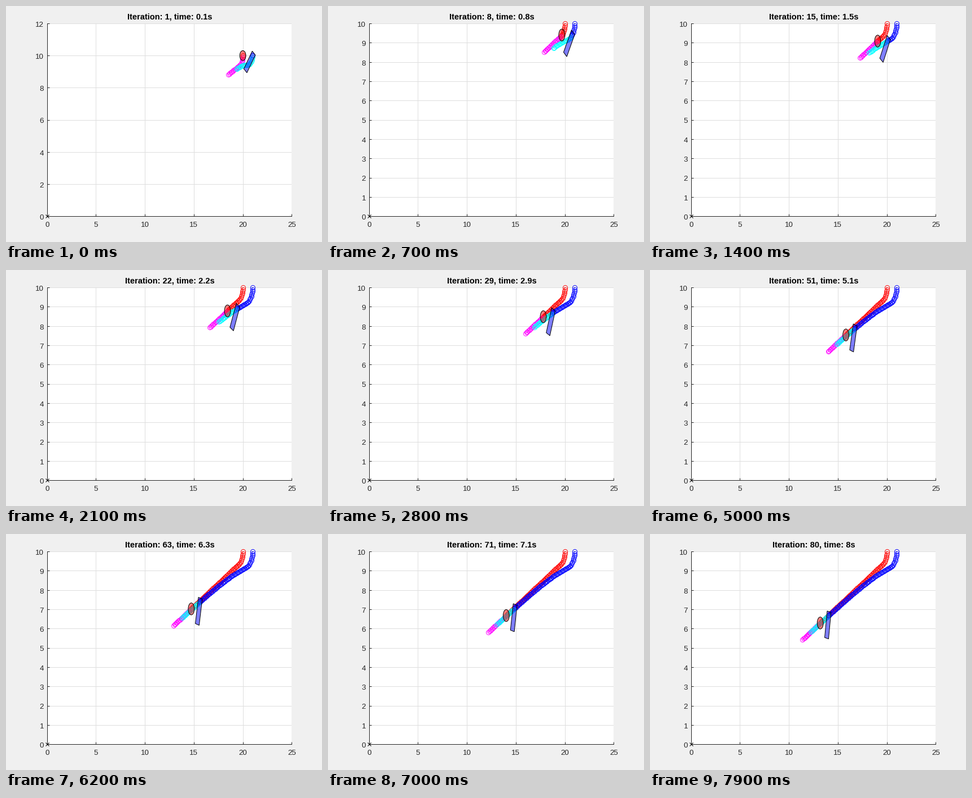
These frames come from a looping animation (560 by 420 pixels, 8000 ms). A matplotlib script:

```python
import numpy as np
import matplotlib.pyplot as plt
from matplotlib.animation import FuncAnimation
from matplotlib.patches import Circle, Polygon

W, H, DPI = 560, 420, 100
PX = 72 / DPI                     # one pixel in points
FRAMES, HORIZON, STEP = 80, 20, 0.1
GOAL = np.radians(205.5)          # direction of the line to the origin
RADIUS, REACH = 0.85, 2.5         # turning circle and line-following distance
INK = "#262626"

plt.rcParams["font.family"] = "Liberation Sans"


def drive(pos, heading, n, radius, reach):
    """Unit-speed steps with bounded turning, easing onto the goal line."""
    pos, path, angles = np.array(pos, float), [], []
    for _ in range(n + 1):
        path.append(pos.copy())
        angles.append(heading)
        off = pos[0] * np.sin(GOAL) - pos[1] * np.cos(GOAL)
        want = GOAL + np.arcsin(np.clip(off / reach, -1, 1))
        turn = np.clip(want - heading, -STEP / radius, STEP / radius)
        mid = heading + turn / 2
        pos = pos + STEP * np.array([np.cos(mid), np.sin(mid)])
        heading += turn
    return np.array(path), angles


DOWN = np.radians(270)
lead, _ = drive((20, 10), DOWN, FRAMES + HORIZON, 0.74, 1e6)
car, car_dir = drive((21, 10), DOWN, FRAMES + HORIZON, RADIUS, REACH)
tilt = np.radians(np.interp(np.arange(FRAMES),
                            [0, 14, 28, 38, 50, 62, 79],
                            [232, 237.9, 247, 252, 255, 257, 259.5]))
BODY = np.array([[-0.2, -0.2], [1.2, -0.2], [1.2, 0.2], [-0.2, 0.2]])

fig = plt.figure(figsize=(W / DPI, H / DPI), dpi=DPI, facecolor="#f0f0f0")
ax = fig.add_axes([72.7 / W, 1 - 374.1 / H, 433.7 / W, 343 / H])
ax.set_xlim(0, 25)
ax.set_xticks(range(0, 26, 5))
ax.set_axisbelow(True)
ax.grid(color="#dedede", lw=PX)
ax.tick_params(direction="in", length=4.3 * PX, width=PX, color=INK,
               labelcolor=INK, labelsize=13.33 * PX, labelleft=False)
ax.tick_params(axis="x", pad=10.2 * PX)
for side, spine in ax.spines.items():
    spine.set_visible(side in ("left", "bottom"))
    spine.set_color(INK)
    spine.set_linewidth(PX)

y_labels = [ax.annotate(str(k), (0, k), xytext=(-5.5, -1.3),
                        textcoords="offset pixels", ha="right",
                        va="center_baseline", size=13.33 * PX, color=INK,
                        annotation_clip=False)
            for k in range(13)]
title = fig.text(290 / W, 1 - 24 / H, "", ha="center", va="baseline",
                 weight="bold", size=14.67 * PX, color="black")


def trail(color, z):
    return ax.plot([], [], "-o", color=color, mfc="none", mew=0.9 * PX,
                   lw=0.9 * PX, ms=8 * PX, clip_on=False, zorder=z)[0]


ax.plot(0, 0, "x", color="black", ms=6 * PX, mew=PX, clip_on=False, zorder=3)
lead_past, car_past = trail("red", 4), trail("blue", 5)
lead_next, car_next = trail("magenta", 6), trail("cyan", 7)


def outlined(patch, rgb):
    patch.set(facecolor=(*rgb, 0.5), edgecolor="black", linewidth=PX,
              zorder=8, clip_on=False)
    return ax.add_patch(patch)


disc = outlined(Circle((0, 0), 0.31), (1, 0, 0))
box = outlined(Polygon(BODY, closed=True), (0, 0, 1))


def update(i):
    c, s = np.cos(tilt[i]), np.sin(tilt[i])
    corners = car[i] + BODY @ np.array([[c, s], [-s, c]])
    disc.center = lead[i]
    box.set_xy(corners)

    lead_past.set_data(*lead[:i + 1].T)
    car_past.set_data(*car[:i + 1].T)
    lead_next.set_data(*lead[i + 1:i + HORIZON + 1].T)
    # early plans cut in more sharply than the path finally taken
    w = np.exp(-i / 3)
    plan, _ = drive(car[i], car_dir[i], HORIZON,
                    RADIUS - 0.27 * w, REACH - 1.8 * w)
    car_next.set_data(*plan[1:].T)

    tall = max(lead[i, 1] + 0.3, corners[:, 1].max()) > 10
    top, gap = (12, 2) if tall else (10, 1)
    ax.set_ylim(0, top)
    ax.set_yticks(range(0, top + 1, gap))
    for k, label in enumerate(y_labels):
        label.set_visible(k <= top and k % gap == 0)
    title.set_text(f"Iteration: {i + 1}, time: {(i + 1) / 10:g}s")
    return []


anim = FuncAnimation(fig, update, frames=FRAMES, interval=100,
                     repeat=True, repeat_delay=0, blit=False)
plt.show()
```
